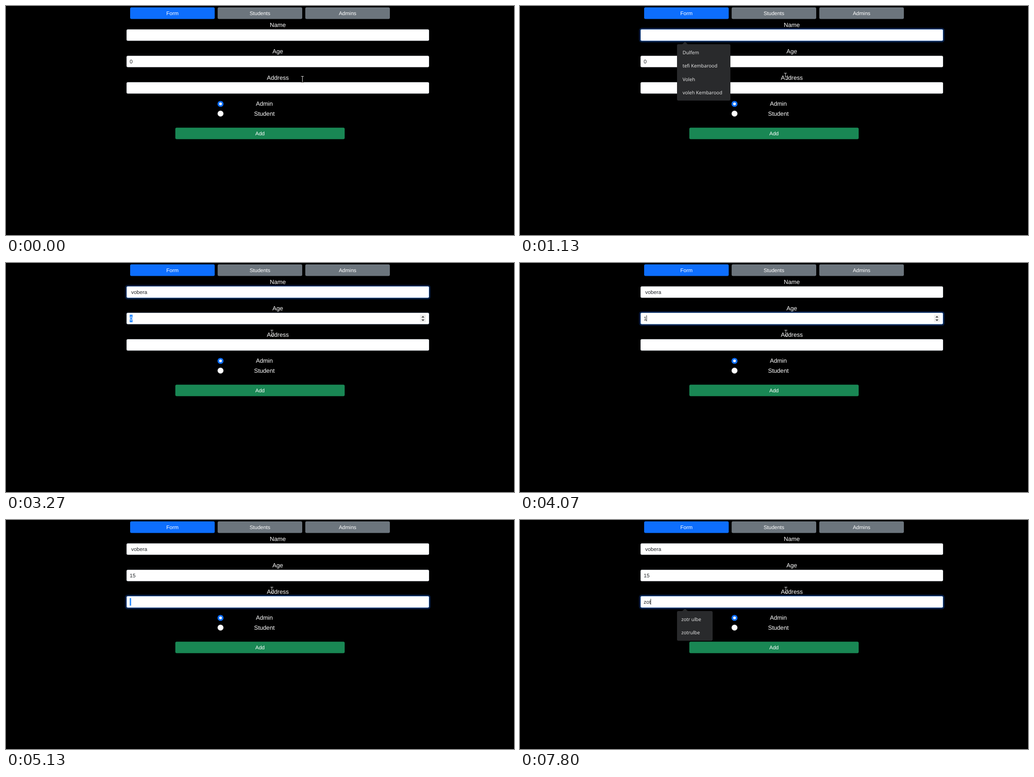
An HTML page with a canvas that plays this animation: 1113x503 px, repeating every 8000 ms.

```html
<!DOCTYPE html>
<html lang="en">
<head>
<meta charset="utf-8">
<title>Add person form</title>
<style>
  html, body { margin: 0; width: 100%; height: 100%; overflow: hidden; background: #000; }
  canvas { display: block; }
</style>
</head>
<body>
<canvas id="stage" width="1113" height="503"></canvas>
<script>
const ctx = document.getElementById('stage').getContext('2d');
const LOOP = 8000;
const SMALL = '11.5px "Liberation Sans", Arial, sans-serif';
const LABEL = '13.1px "Liberation Sans", Arial, sans-serif';
const MENU = '10.5px "Open Sans", "Noto Sans", sans-serif';
const INPUT = { x: 264, w: 663, h: 25.4, textX: 271 };

// keys: [time, text from then on]; an entry with select shows its text highlighted
const fields = [
  { label: 'Name', y: 51.2, focus: 530, blur: 3270,
    keys: [[0, ' '], [1470, ' v'], [1670, ' vo'], [2270, ' vob'], [2530, ' vobe'], [2670, ' vober'], [2800, ' vobera']] },
  { label: 'Age', y: 109.2, focus: 3270, blur: 4870, select: true, spinner: true,
    keys: [[0, '0'], [4070, '1'], [4330, '15']] },
  { label: 'Address', y: 167.2, focus: 4870, blur: Infinity, select: true,
    keys: [[0, ' '], [7070, 'z'], [7200, 'zo'], [7800, 'zot']] },
];

const menus = [
  { from: 730, to: 1470, y: 84, w: 117, items: [' Dulfem', ' tefi Kembarood', ' Voleh', ' voleh Kembarood'] },
  { from: 1470, to: 2270, fade: true, y: 84, w: 117, items: [' Voleh', ' voleh Kembarood'] },
  { from: 4130, to: 4330, fade: true, y: 142, w: 78, items: ['13', '130', '130esds', '130sadsa'] },
  { from: 7200, to: Infinity, y: 200, w: 78, items: ['zotr ulbe', 'zotrulbe'] },
];

const clamp = v => Math.min(1, Math.max(0, v));
const smooth = v => v * v * (3 - 2 * v);
const mix = (a, b, p) => a + (b - a) * p;

function box(x, y, w, h, r, color) {
  ctx.fillStyle = color;
  ctx.beginPath();
  ctx.roundRect(x, y, w, h, r);
  ctx.fill();
}

function text(str, x, y, font, color, align = 'left') {
  ctx.font = font;
  ctx.fillStyle = color;
  ctx.textAlign = align;
  ctx.fillText(str, x, y);
}

function disc(x, y, r, color) {
  ctx.fillStyle = color;
  ctx.beginPath();
  ctx.arc(x, y, r, 0, Math.PI * 2);
  ctx.fill();
}

function triangle(x, y, halfWidth, height, color) {
  ctx.fillStyle = color;
  ctx.beginPath();
  ctx.moveTo(x - halfWidth, y);
  ctx.lineTo(x + halfWidth, y);
  ctx.lineTo(x, y + height);
  ctx.fill();
}

function button(label, x, y, w, color) {
  box(x, y, w, 25.4, 3, color);
  text(label, x + w / 2, y + 16.7, SMALL, '#fff', 'center');
}

function radio(label, y, checked) {
  disc(470, y, 6.6, checked ? '#0d6efd' : '#bfbfbf');
  disc(470, y, checked ? 3 : 5.8, '#fff');
  text(label, 566, y + 4.3, LABEL, '#fff', 'center');
}

function drawField(f, t) {
  const { x, w, h, textX } = INPUT;
  const ramp = start => clamp((t - start + 20) / 150) * (t >= start);
  const glow = ramp(f.focus) - ramp(f.blur);
  const focused = t >= f.focus && t < f.blur;
  const [keyTime, value] = f.keys.findLast(k => t >= k[0]);

  text(f.label, 595.5, f.y - 5.7, LABEL, '#fff', 'center');
  box(x - 3.3, f.y - 3.3, w + 6.6, h + 6.6, 6, `rgba(13,110,253,${0.25 * glow})`);
  box(x, f.y, w, h, 3, '#ced4da');
  box(x, f.y, w, h, 3, `rgba(134,183,254,${glow})`);
  box(x + 0.8, f.y + 0.8, w - 1.6, h - 1.6, 2.4, '#fff');

  if (f.spinner && focused) {
    box(907, f.y + 4, 13, 17, 1, '#efefef');
    triangle(913.5, f.y + 10.5, 3.3, -3.5, '#404040');
    triangle(913.5, f.y + 14.8, 3.3, 3.5, '#404040');
  }

  ctx.font = SMALL;
  const end = textX + ctx.measureText(value).width;
  const selected = f.select && focused && keyTime === 0;
  if (selected) box(textX, f.y + 4.3, end - textX, 16.7, 0, '#3390ff');
  text(value, textX, f.y + 16.6, SMALL, selected ? '#fff' : '#212529');

  const sinceInput = t - Math.max(keyTime, f.focus);
  if (focused && !selected && sinceInput % 1000 < 500) {
    box(Math.round(end), Math.round(f.y + 5.8), 1, 13, 0, '#212529');
  }
}

function drawMenu(m, t) {
  let alpha = t >= m.from && t < m.to ? 1 : 0;
  if (m.fade && t >= m.to) alpha = clamp(0.74 - (t - m.to) / 200);
  if (!alpha) return;
  const x = 344, pitch = 29.3, h = m.items.length * pitch + 6.6;
  const scale = 1 - 0.048 * (1 - alpha);
  const cx = x + m.w / 2, cy = m.y + h / 2;
  ctx.save();
  ctx.globalAlpha = alpha;
  ctx.translate(cx, cy);
  ctx.scale(scale, scale);
  ctx.translate(-cx, -cy);
  triangle(361.5, m.y, 6, -5.5, '#292a2c');
  box(x, m.y, m.w, h, 3, '#292a2c');
  m.items.forEach((item, i) => text(item, 353.5, m.y + 22 + i * pitch, MENU, '#f2f2f2'));
  ctx.restore();
}

function drawPointer(t) {
  const toInput = smooth(clamp((t - 10) / 520));
  const away = smooth(clamp((t - 930) / 200));
  const x = Math.round(mix(650, 580, toInput) + 2 * away + (t >= 1930 ? 1 : 0)) - 0.5;
  const y = Math.round(mix(mix(161, 66, toInput), 154, away));
  ctx.save();
  ctx.globalCompositeOperation = 'difference';
  ctx.strokeStyle = '#dcdcdc';
  ctx.lineWidth = 1;
  ctx.beginPath();
  ctx.moveTo(x, y - 6);
  ctx.lineTo(x, y + 6);
  for (const serif of [y - 6.5, y + 6.5]) {
    ctx.moveTo(x - 3, serif);
    ctx.lineTo(x + 3, serif);
  }
  ctx.stroke();
  ctx.restore();
}

function draw(t) {
  ctx.textRendering = 'geometricPrecision';
  ctx.fillStyle = '#000';
  ctx.fillRect(0, 0, 1113, 503);
  button('Form', 272, 3, 185.3, '#0d6efd');
  button('Students', 463.7, 3, 185.3, '#6c757d');
  button('Admins', 655.7, 3, 185.3, '#6c757d');
  fields.forEach(f => drawField(f, t));
  radio('Admin', 215, true);
  radio('Student', 236.4, false);
  button('Add', 371, 267.2, 371, '#198754');
  menus.forEach(m => drawMenu(m, t));
  drawPointer(t);
}

// The picture advances 15 times a second, on times rounded to 10 ms.
const start = performance.now();
function tick() {
  const elapsed = Math.max(0, performance.now() - start) % LOOP;
  const step = Math.floor((elapsed + 4) * 0.015);
  draw(Math.min(LOOP - 10, Math.round(step / 0.15) * 10));
  requestAnimationFrame(tick);
}
tick();
</script>
</body>
</html>
```
